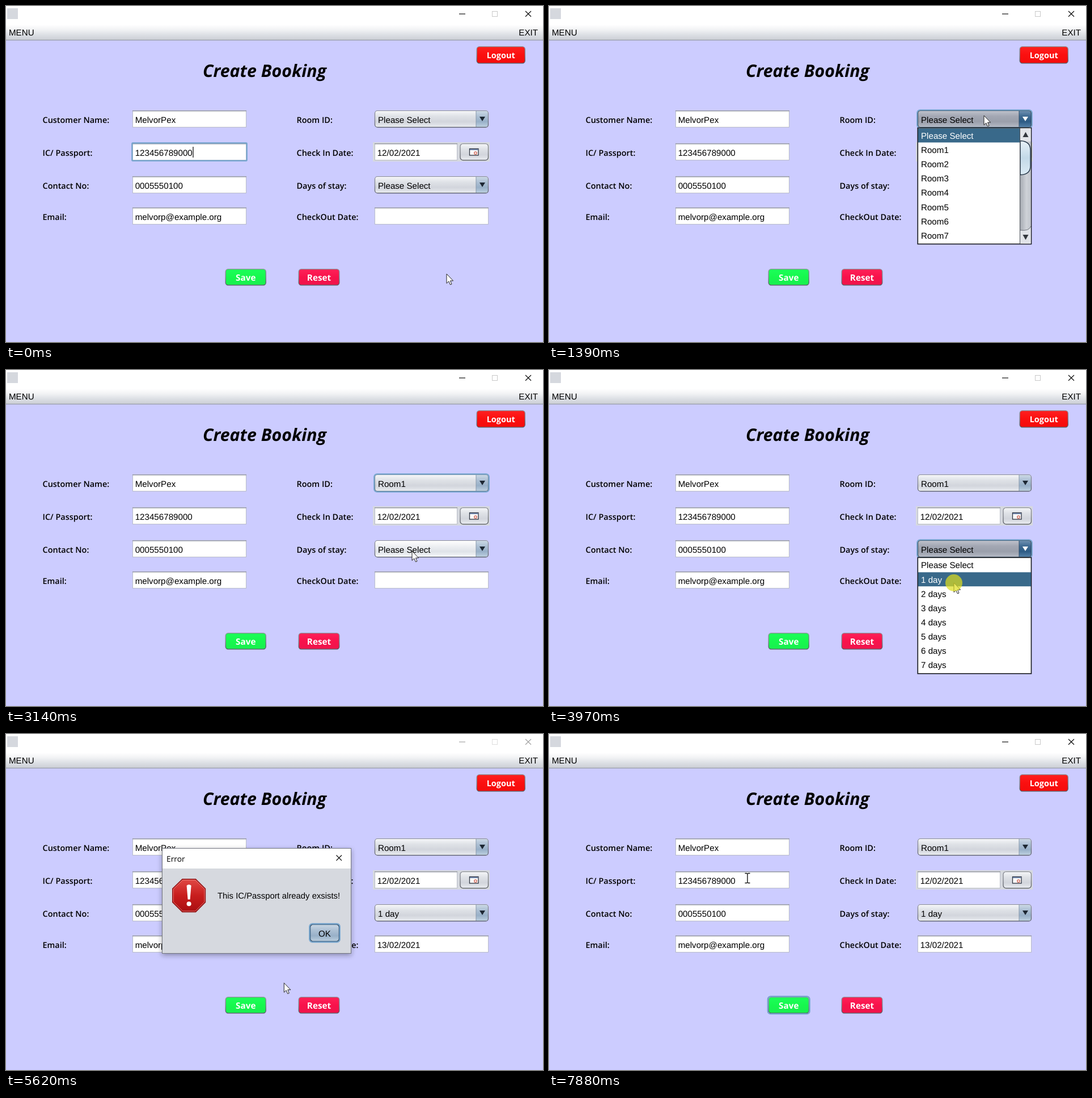
An HTML page for the animation above (7990 ms loop, 947 by 592 pixels).

```html
<!DOCTYPE html>
<html lang="en">
<head>
<meta charset="utf-8">
<title>Create Booking</title>
<style>
  html, body { margin: 0; width: 100%; height: 100%; overflow: hidden; background: #ccccff; }
  svg { display: block; width: 947px; height: 592px; }
  text { font: 15.15px "Liberation Sans", Arial, sans-serif; fill: #000; white-space: pre; text-rendering: geometricPrecision; }
  .label { font: 600 14.45px "Open Sans", "Noto Sans", sans-serif; }
  .title { font: italic 700 30.3px "Open Sans", "Noto Sans", sans-serif; }
  .btn { font: 700 15.3px "Open Sans", "Noto Sans", sans-serif; fill: #fff; text-anchor: middle; }
  .small { font-size: 14.5px; }
  .bar { font: 13.8px "Open Sans", "Noto Sans", sans-serif; }
  .msg { font-size: 14.85px; }
  .mid { text-anchor: middle; }
  .inv { fill: #fff; }
</style>
</head>
<body>
<svg viewBox="0 0 947 592">
  <defs></defs>
  <g id="scene"></g>
</svg>
<script>
const CYCLE = 7990;

// start, end, steps, target x, target y
const MOVES = [
  [340, 860, 6, 767, 193],
  [1810, 2120, 4, 735, 246],
  [2720, 2930, 3, 716, 319],
  [3470, 3670, 3, 714, 375],
  [4400, 4400, 1, 676, 387],
  [4550, 4770, 3, 438, 485],
  [5410, 5720, 4, 500, 430],
  [5860, 6610, 8, 556, 351],
  [7010, 7420, 5, 360, 288],
  [7570, 7880, 4, 350, 254]
];
const CLICKS = [[960, 1070], [2510, 2620], [3040, 3140], [3970, 4070], [4880, 5030], [6710, 6830]];
const ROWS = [184, 242, 300, 355];
const ROOMS = ['Please Select', ...Array.from({length: 7}, (_, i) => 'Room' + (i + 1))];
const DAYS = ['Please Select', '1 day', ...Array.from({length: 6}, (_, i) => i + 2 + ' days')];
const ROW_H = 25.15;

const gradient = (id, ...stops) =>
  `<linearGradient id="${id}" x2="0" y2="1">${stops.map((c, i) =>
    `<stop offset="${i / (stops.length - 1)}" stop-color="${c}"/>`).join('')}</linearGradient>`;

document.querySelector('defs').innerHTML =
  gradient('menu', '#ffffff', '#f1f2f4', '#dcdfe4', '#cbced5') +
  gradient('face', '#f6f7f9', '#dfe2e7', '#d2d5dc', '#e8ebef') +
  gradient('hover', '#ffffff', '#eef0f3', '#dfe3e8', '#f6f8fa') +
  gradient('down', '#bfc2cc', '#a3a7b3', '#9a9fab', '#b5bac5') +
  gradient('tip', '#cbd8e5', '#adc0d4', '#98b0c8', '#bccfdf') +
  gradient('tipDown', '#6d8fb0', '#3f6a92', '#2d5b85', '#527fa6') +
  gradient('ok', '#f4f8fb', '#c6d6e5', '#aec4d8', '#d3e3ef') +
  gradient('thumb', '#e8f2f9', '#c3d9e8', '#dcebf5') +
  gradient('red', '#ff2020', '#fb0f0f', '#f40c0c') +
  gradient('green', '#1cff59', '#16f84e', '#19ee4f') +
  gradient('pink', '#ff2158', '#f8124b', '#ee144c') +
  gradient('rim', '#8b8e96', '#7b7e86', '#55585f') +
  gradient('stop', '#e04a45', '#c81d1d', '#a90f12') +
  '<linearGradient id="track"><stop stop-color="#a4a8b0"/><stop offset=".6" stop-color="#cfd2d8"/><stop offset="1" stop-color="#bfc3ca"/></linearGradient>' +
  '<filter id="shade" x="-10%" y="-15%" width="120%" height="135%"><feDropShadow dx="0" dy="3" stdDeviation="4" flood-color="#223" flood-opacity=".4"/></filter>';

const text = (x, y, s, cls = '') => `<text x="${x}" y="${y}" class="${cls}">${s}</text>`;
const rect = (x, y, w, h, fill, more = '') =>
  `<rect x="${x}" y="${y}" width="${w}" height="${h}" fill="${fill}" ${more}/>`;
const path = (d, fill, more = '') => `<path d="${d}" fill="${fill}" ${more}/>`;
const line = (d, color, w = 1) => path(d, 'none', `stroke="${color}" stroke-width="${w}"`);
const ring = (x, y, w, h, r = 5) =>
  rect(x - .7, y - .7, w + 1.4, h + 1.4, 'none', `rx="${r}" stroke="#73a4cd" stroke-width="2.2"`);

function field(x, y, w, value, focus) {
  return rect(x + .5, y + .5, w - 1, 29, '#fff', 'stroke="#b9bcc8"') +
    rect(x, y, w, 1.3, '#8d9099') + rect(x + 1, y + 1.3, w - 2, 1.2, '#d8dae0') +
    (focus ? ring(x, y, w, 30, 1) : '') + text(x + 4.7, y + 21.5, value);
}

function combo(y, value, {open, hover, focus}) {
  const edge = open ? '#20242b' : 'url(#rim)';
  return rect(651, y + 1.5, 200, 29.5, '#9296b8', 'rx="5" opacity=".5"') +
    rect(650.5, y + .5, 200, 29, `url(#${open ? 'down' : hover ? 'hover' : 'face'})`, 'rx="4.5"') +
    path(`M829 ${y + 1}H846Q850 ${y + 1} 850 ${y + 5}V${y + 25}Q850 ${y + 29} 846 ${y + 29}H829Z`,
      `url(#${open ? 'tipDown' : 'tip'})`) +
    line(`M829 ${y + 1}V${y + 29}`, open ? '#34506b' : '#8798ab') +
    rect(650.5, y + .5, 200, 29, 'none', `rx="4.5" stroke="${edge}" stroke-width="1.2"`) +
    (focus || open ? ring(650, y, 201, 30) : '') +
    path(`M835 ${y + 11}H845L840 ${y + 19}Z`, open ? '#fff' : '#1d2733') +
    text(656, y + 21.8, value);
}

function button(x, y, w, h, fill, label, {focus, cls = ''} = {}) {
  return rect(x + .7, y + .7, w - 1.4, h - 1.4, `url(#${fill})`, 'rx="4.5" stroke="url(#rim)" stroke-width="1.3"') +
    (focus ? ring(x, y, w, h) : '') + text(x + w / 2, y + h / 2 + 5.8, label, 'btn ' + cls);
}

function popup(y, items, hot, scroll) {
  const w = scroll ? 179 : 199;
  let out = rect(650.3, y + .8, 200.2, 204.6, '#fff', 'stroke="#16181c" stroke-width="1.6"');
  items.forEach((s, i) => {
    const top = y + 1.6 + i * ROW_H;
    if (i === hot) out += rect(651, top, w, ROW_H - .3, '#39698a');
    out += text(656, top + 18.2, s, i === hot ? 'inv' : '');
  });
  return scroll ? out + scrollbar(y) : out;
}

function scrollbar(y) {
  return rect(830.5, y + 1.6, 19.3, 203, 'url(#track)') +
    rect(830.5, y + 1.6, 19.3, 23, '#e3e5e9') +
    path(`M830.5 ${y + 181}Q847 ${y + 183} 849.8 ${y + 174}V${y + 204.6}H830.5Z`, '#e1e3e8') +
    line(`M830.5 ${y + 181}Q847 ${y + 183} 849.8 ${y + 174}`, '#6e737b') +
    path(`M831 ${y + 23.5}Q849 ${y + 24} 849 ${y + 40}V${y + 68}Q849 ${y + 83} 831 ${y + 83.5}Z`,
      'url(#thumb)', 'stroke="#27394a" stroke-width="1.4"') +
    path(`M835.5 ${y + 17}H845.5L840.5 ${y + 8}Z`, '#33373d') +
    path(`M835.5 ${y + 189}H845.5L840.5 ${y + 198}Z`, '#33373d') +
    line(`M830.5 ${y + 1}V${y + 205}`, '#4b5058');
}

function dialog(hover) {
  return '<g filter="url(#shade)">' + rect(275, 201, 334, 186, '#d6d9df') + '</g>' +
    rect(275, 201, 334, 36, '#fff') +
    rect(275.5, 201.5, 333, 185, 'none', 'stroke="#74777f"') +
    text(283, 224.5, 'Error', 'bar') +
    line('M582.5 213.5L592 223M592 213.5L582.5 223', '#111', 1.2) +
    path('M311 255.7H334.5L351.5 272.5V296.5L334.5 313.5H311L293.7 296.5V272.5Z', 'url(#stop)',
      'stroke="#8c1013" stroke-width="1.4"') +
    path('M311.6 257.3H333.9L350 273.2V295.8L333.9 312H311.6L295.2 295.8V273.2Z', 'none',
      'stroke="#ee8a85" stroke-width="1" opacity=".8"') +
    path('M318.6 267Q322.6 263.5 326.6 267L324.6 291.5H320.6Z', '#fff') +
    '<circle cx="322.6" cy="299.3" r="4" fill="#fff"/>' +
    text(373, 290, 'This IC/Passport already exsists!', 'msg') +
    rect(536.5, 335.5, 51, 30, `url(#${hover ? 'ok' : 'tip'})`, 'rx="5" stroke="#27435e" stroke-width="1.4"') +
    ring(536, 335, 52, 31) + text(562, 356.5, 'OK', 'mid');
}

function dateRow() {
  return rect(647, 240, 206, 34, '#d6d9df') + field(650, 242, 146, '12/02/2021') +
    rect(801, 242.6, 49.5, 29, 'url(#face)', 'rx="5" stroke="url(#rim)" stroke-width="1.3"') +
    rect(817.5, 251.5, 15.5, 11.5, '#fafafa', 'stroke="#2e3440" stroke-width="1.3"') +
    rect(818, 252, 14.5, 2, '#7288ad') +
    '<circle cx="828" cy="259" r="2.2" fill="#fff" stroke="#cf6252" stroke-width="1.3"/>';
}

function frameBar(active) {
  const ink = active ? '#111' : '#a3a3a3';
  return rect(0, 0, 947, 592, '#ccccff') + rect(0, 0, 947, 33, '#fff') +
    rect(2, 4, 19, 19, '#d5d8de') +
    line('M799 14H810', ink, 1.2) +
    rect(857.5, 9.5, 9, 9, 'none', `stroke="${active ? '#c9c9c9' : '#dedede'}"`) +
    line('M916 9L926 18.8M926 9L916 18.8', ink, 1.2) +
    rect(0, 33, 947, 27, 'url(#menu)') + rect(0, 59.5, 947, 1.2, '#969ba5') +
    text(5, 52.3, 'MENU') + text(904.3, 52.3, 'EXIT');
}

function cursorAt(t) {
  let x = 777, y = 472;
  for (const [a, b, n, tx, ty] of MOVES) {
    if (t < a) break;
    const step = (b - a) / (n - 1) || 1;
    const k = Math.min(n, 1 + Math.floor((t - a) / step + 1e-6)) / n;
    const p = k * k * (3 - 2 * k);
    x += (tx - x) * p;
    y += (ty - y) * p;
  }
  return [x, y];
}

function pointer(x, y, beam) {
  const shape = beam
    ? line('M-4.5 -8.5H-1.5L0 -7.5 1.5 -8.5H4.5M0 -7.5V7.5M-4.5 8.5H-1.5L0 7.5 1.5 8.5H4.5', '#111', 1.4)
    : path('M0 0V16.6L3.8 13 6.4 19 9 18 6.5 12.1H11.6Z', '#fff', 'stroke="#222" stroke-width="1"');
  return `<g transform="translate(${x.toFixed(1)} ${y.toFixed(1)})">${shape}</g>`;
}

function scene(t) {
  const [x, y] = cursorAt(t);
  const during = (a, b) => t >= a && t < b;
  const over = (l, top, w, h) => x >= l && x < l + w && y >= top && y < top + h;
  const roomOpen = during(1280, 2620), dayOpen = during(3250, 4070), modal = during(5220, 6830);
  const hot = top => Math.max(0, Math.floor((y - top - 1.6) / ROW_H));
  const room = t < 2620 ? ROOMS[0] : ROOMS[1];
  const day = t < 4070 ? DAYS[0] : DAYS[1];
  const checkOut = t < 4070 ? '' : '13/02/2021';
  const values = ['MelvorPex', '123456789000', '0005550100', 'melvorp@example.org'];
  const left = ['Customer Name:', 'IC/ Passport:', 'Contact No:', 'Email:'];
  const right = ['Room ID:', 'Check In Date:', 'Days of stay:', 'CheckOut Date:'];

  let out = frameBar(!during(5030, 6830)) +
    text(347, 125.3, 'Create Booking', 'title') +
    button(829.5, 71, 86.5, 30.5, 'red', 'Logout', {cls: 'small'});
  ROWS.forEach((top, i) => {
    out += text(64.5, top + 21.5, left[i], 'label') + text(512.5, top + 21.5, right[i], 'label') +
      field(223, top, 201, values[i], i === 1 && t < 1170);
  });
  if (t < 550) out += line('M330 248V267', '#000', 1.2);
  out += combo(184, room, {
      open: during(1170, 2620), hover: over(650, 184, 201, 30), focus: during(2620, 3250)
    }) + dateRow() +
    combo(300, day, {
      open: dayOpen, hover: over(650, 300, 201, 30), focus: during(4070, 5030)
    }) + field(650, 355, 201, checkOut) +
    button(386.5, 463, 72.5, 29.5, 'green', 'Save', {focus: t >= 6830}) +
    button(515.5, 463, 73, 29.5, 'pink', 'Reset');
  if (roomOpen) out += popup(214, ROOMS, hot(214), true);
  if (dayOpen) out += popup(329.6, DAYS, hot(329.6), false);
  if (modal) out += dialog(over(535, 334, 53, 32));

  const beam = !modal && ROWS.some(top => over(223, top, 201, 30));
  out += pointer(x, y, beam);
  if (CLICKS.some(([a, b]) => during(a, b)))
    out += `<circle cx="${x}" cy="${y}" r="15" fill="#dede1c" opacity=".7"/>`;
  return out;
}

const stage = document.getElementById('scene');
const start = performance.now();
let shown = '';
function tick() {
  const next = scene((performance.now() - start) % CYCLE);
  if (next !== shown) stage.innerHTML = shown = next;
  requestAnimationFrame(tick);
}
tick();
</script>
</body>
</html>
```
